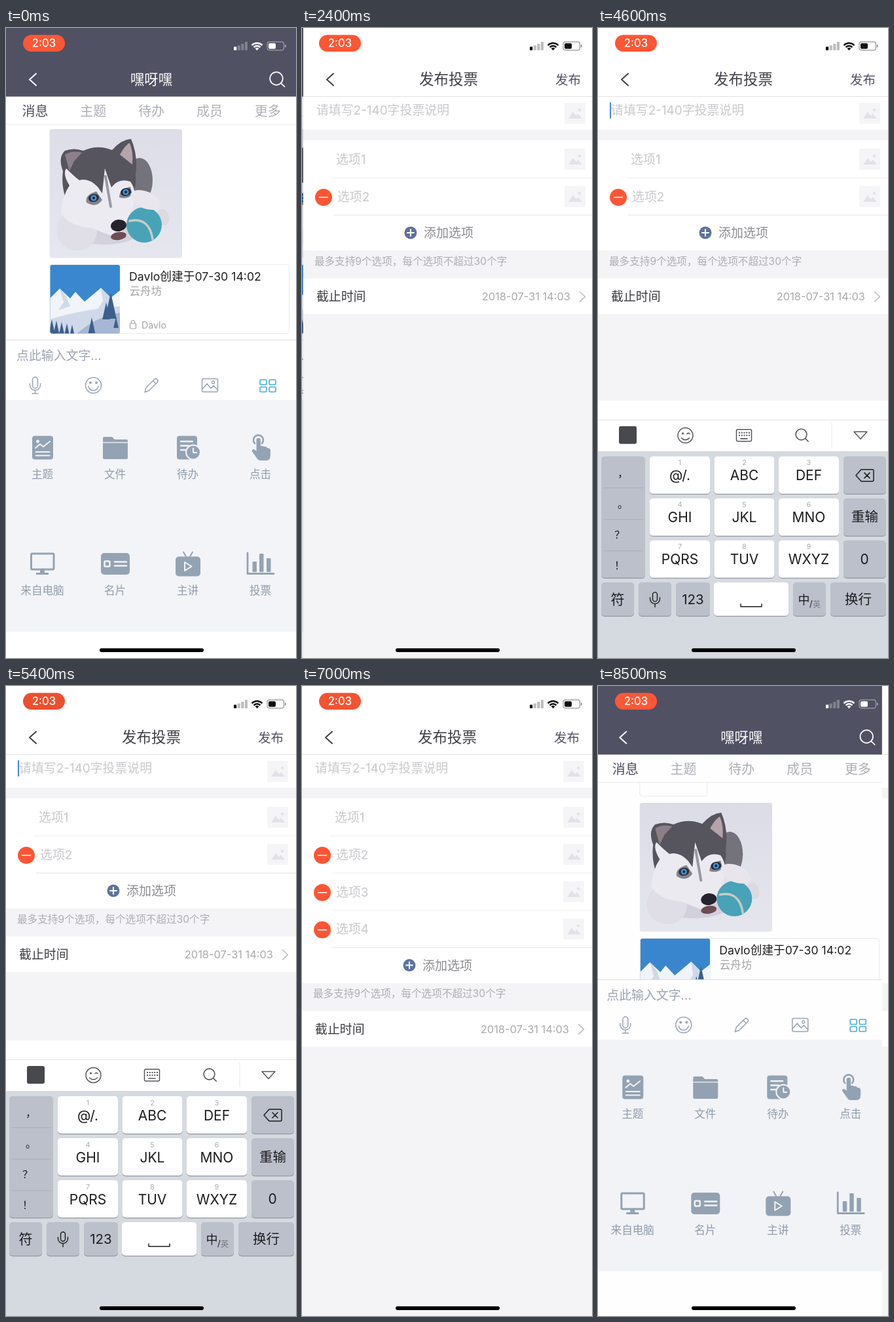
An HTML page that plays this animation: 443 by 960 pixels, repeating every 8600 ms.

```html
<!DOCTYPE html>
<html lang="zh-CN">
<head>
<meta charset="utf-8">
<title>发布投票</title>
<style>
html, body { margin: 0; width: 100%; height: 100%; overflow: hidden; background: #fff; }
svg { display: block; width: 443px; height: 960px; }
text { font-family: Inter, "Noto Sans CJK SC", "Noto Sans CJK", sans-serif; white-space: pre; }
.line { fill: none; stroke-linecap: round; stroke-linejoin: round; }
</style>
</head>
<body>
<svg id="stage" viewBox="0 0 443 960"></svg>
<script>
const W = 443, LOOP = 8600, STEP = 100, ROW = 56.8;
const INK = '#94a3b3', PANEL = '#f3f4f7', RED = '#ff5535';

// Markup helpers
const rect = (x, y, w, h, fill, rx = 0, more = '') =>
  `<rect x="${x}" y="${y}" width="${w}" height="${h}" fill="${fill}" rx="${rx}" ${more}/>`;
const circle = (x, y, r, fill, more = '') =>
  `<circle cx="${x}" cy="${y}" r="${r}" fill="${fill}" ${more}/>`;
const oval = (x, y, rx, ry, fill, turn = 0) =>
  `<ellipse rx="${rx}" ry="${ry}" fill="${fill}" transform="translate(${x} ${y}) rotate(${turn})"/>`;
const shape = (d, fill) => `<path d="${d}" fill="${fill}"/>`;
const line = (d, color, w = 1.5) =>
  `<path class="line" d="${d}" stroke="${color}" stroke-width="${w}"/>`;
const text = (x, y, size, fill, str, anchor = 'start', weight = 400) =>
  `<text x="${x}" y="${y}" font-size="${size}" fill="${fill}" text-anchor="${anchor}" font-weight="${weight}">${str}</text>`;
const mid = (x, y, size, fill, str, weight) => text(x, y, size, fill, str, 'middle', weight);
const group = (id, body) => `<g id="${id}">${body}</g>`;
const ring = (x, y, r, color, w = 1.5) =>
  circle(x, y, r, 'none', `stroke="${color}" stroke-width="${w}"`);

const back = color => line('M46 69.5L36 78.5L46 87.5', color, 2);
const lens = (x, y, r, color, w) =>
  ring(x, y, r, color, w) + line(`M${x + r * .72} ${y + r * .72}l${r * .55} ${r * .55}`, color, w);

function puppy() {
  const dark = '#56545d', fur = '#ecebf1';
  return `<g clip-path="url(#photo)">` +
    rect(66, 154, 203, 197, 'url(#snow)') +
    oval(204, 232, 20, 34, '#74727b') +
    oval(150, 306, 58, 24, '#d3d2dc') +
    oval(108, 309, 31, 30, '#e0dfe7', 25) +
    shape('M92 262Q84 240 87 218Q79 197 90 187Q104 182 118 187Q140 177 162 186Q176 170 191 169Q202 194 198 224Q200 246 190 258Z', dark) +
    shape('M90 193Q102 186 116 190L104 203L97 218Z', '#8d8088') +
    shape('M174 193Q182 178 189 175Q195 190 193 208Z', '#b5a4aa') +
    shape('M97 240Q86 222 92 214Q104 226 112 232Q126 228 140 242L147 252L151 214L161 243Q172 228 190 234Q203 252 191 280Q184 310 166 318Q150 313 132 305Q96 302 84 282Q86 256 97 240Z', fur) +
    shape('M123 266Q120 254 138 249L147 262Q138 275 123 266ZM173 258Q173 245 190 242L193 254Q184 262 173 258Z', '#85838e') +
    line('M152 226L160 272', '#9a98a3', 4) +
    [[134, 259], [183, 250]].map(([x, y]) =>
      oval(x, y, 8, 6, '#2d2c35', -10) + circle(x, y, 4.6, '#3f94dc') + circle(x, y, 2, '#16233a')).join('') +
    oval(172, 317, 12, 6, '#6d4d55', -8) +
    oval(172, 301, 12, 9, '#25232b', -8) +
    oval(240, 288, 9, 13, '#dedae1', -15) +
    circle(211, 300, 27, '#48a3b9') +
    line('M189 294Q219 288 224 322', '#c9cdc4', 3.5) +
    oval(213, 262, 24, 13, '#e9e7ed', 22) +
    '</g>';
}

function tree(x, y, h) {
  const w = h * .22;
  return shape(`M${x} ${y}l${w} ${h}h${-2 * w}Z`, '#3d5f8c');
}

function mountains() {
  return `<g clip-path="url(#hill)">` +
    rect(67, 360, 107, 106, '#3a87cf') +
    shape('M67 412L82 397L98 412L106 402L120 417L145 396L160 411L174 400V466H67Z', '#f1f4f9') +
    shape('M82 397L88 418L80 430L98 424L92 409ZM145 396L148 416L138 432L158 426L160 411Z', '#cfdaea') +
    shape('M67 444Q110 430 174 424V466H67Z', '#d0d9ea') +
    shape('M108 466Q140 438 174 434V466Z', '#a6b6d4') +
    tree(160, 403, 40) + tree(153, 418, 26) + tree(131, 441, 24) + tree(168, 440, 17) +
    [70, 77, 85, 93, 101].map((x, i) => tree(x, 444 + i * 2, 24)).join('') +
    '</g>';
}

function messages() {
  const edge = 'stroke="#e8eaec"';
  return rect(66.5, 60, 103, 84, '#fff', 4, edge) + puppy() +
    rect(67, 360.5, 365.5, 105, '#fff', 4, edge) + mountains() +
    text(188, 385, 17.7, '#1d1d20', 'Davlo创建于07-30 14:02') +
    text(188.5, 407, 16.5, '#a3a3a7', '云舟坊') +
    rect(189.5, 450, 9, 8, 'none', 1, 'stroke="#a3a3a7" stroke-width="1.2"') +
    line('M191.5 450v-2a2.5 2.5 0 0 1 5 0v2', '#a3a3a7', 1.2) +
    text(207, 457.5, 14.2, '#a3a3a7', 'Davlo');
}

function inputIcons() {
  const c = '#9aa4b4';
  return rect(40.5, 532, 8, 17, 'none', 4, `stroke="${c}" stroke-width="1.5"`) +
    line('M36.5 542v2a8 8 0 0 0 16 0v-2M44.5 552v5M40 557h9', c) +
    ring(133.5, 544.5, 12, c) + circle(129, 540.5, 2, c) + circle(138, 540.5, 2, c) +
    line('M126 546a7.600 7.600 0 0 0 15 0', c) +
    line('M212 555l2-7l13-13q2-1.500 4 .5t.5 4l-13 13ZM224.500 537.500l4.500 4.500', c) +
    rect(299.5, 534.5, 24, 20, 'none', 2, `stroke="${c}" stroke-width="1.5"`) +
    line('M300 550l7-8l6 7l4-4l6 6', c) + ring(316.5, 540, 2, c, 1.3) +
    [[388, 536], [402, 536], [388, 547], [402, 547]].map(([x, y]) =>
      rect(x, y, 10, 7.5, 'none', 1.5, 'stroke="#48acd8" stroke-width="1.6"')).join('');
}

function toolIcons() {
  const cut = PANEL;
  return [
    rect(40, 621.5, 32, 36, INK, 4) + circle(48.5, 630, 2.4, cut) +
      line('M45 640l7-6l5 4l10-8', cut, 2) + line('M45.500 646h21M45.500 651.500h21', cut, 2),
    shape('M148 631v-6q0-2 2-2h12l4 4h18q2 0 2 2v2ZM148 632.300h38v22.200q0 2.500-2.500 2.500h-33q-2.500 0-2.500-2.500Z', INK),
    rect(261, 621.5, 31, 36, INK, 4) + line('M267 630h18M267 636.500h12M267 643h7', cut, 2.3) +
      circle(286, 646.5, 11, INK, `stroke="${cut}" stroke-width="2"`) + line('M286 640.500v6.500h5', cut, 2),
    line('M380 633a7.500 7.500 0 1 1 11 0', INK, 2.6) +
      shape('M382.500 628a3.200 3.200 0 0 1 6.400 0v9q3-1 5 1q4-1 5 2q4-.5 5 3v8q0 8-6 8h-9q-4 0-6-4l-6.500-9q-1.500-3 1-4q2.500-.5 5.100 3Z', INK),
    rect(38.5, 801, 34.5, 24, 'none', 1.5, `stroke="${INK}" stroke-width="3"`) +
      shape('M52 826h7v4h6v3h-19v-3h6Z', INK),
    rect(145, 800, 44, 33, INK, 5) +
      rect(150.5, 812.5, 8, 8, 'none', 1.5, `stroke="${cut}" stroke-width="2.4"`) +
      line('M166 813.500h18M166 819.500h18', cut, 2.4),
    rect(259, 805.5, 38, 30, INK, 5) + line('M271 798.500l4 7M285 798.500l-4 7', INK, 2) +
      line('M273 814v13l10.500-6.500Z', cut, 2),
    line('M369 800v31.500h40', INK, 2.8) +
      rect(376.5, 813, 6.5, 16, INK, 1) + rect(387, 801, 6.5, 28, INK, 1) + rect(398, 808, 6.5, 21, INK, 1)
  ].join('');
}

function chat() {
  const labels = ['主题', '文件', '待办', '点击', '来自电脑', '名片', '主讲', '投票'];
  const tabs = ['消息', '主题', '待办', '成员', '更多'];
  const composer = rect(0, 475, W, 520, '#fff') + rect(0, 475, W, 1, '#dadde1') +
    text(16, 506, 18.9, '#9ba3b2', '点此输入文字...') + inputIcons() +
    rect(0, 567, W, 353, PANEL) + toolIcons() +
    labels.map((s, i) =>
      mid(55.5 + i % 4 * 111, i < 4 ? 685.5 : 862.5, 16.6, '#8f9cae', s)).join('');
  return rect(0, 0, W, 960, '#fff') + group('feed', messages()) + group('composer', composer) +
    rect(0, 104, W, 43, '#fff') + rect(0, 146.5, W, 1, '#ebebee') +
    tabs.map((s, i) =>
      mid(44.5 + i * 88.8, 133.5, 20, i ? '#adafb6' : '#4a4b5c', s, i ? 400 : 500)).join('') +
    rect(0, 0, W, 104.5, '#505163') + back('#fff') + mid(222, 86, 21.3, '#fff', '嘿呀嘿') +
    lens(413, 77, 9.8, '#fff', 1.7);
}

function thumb(y) {
  return rect(399, y, 32, 32, '#f5f5f7') +
    shape(`M405 ${y + 24}l7-10l5 6l3-3l6 7Z`, '#e2e2e8') + circle(422, y + 11, 2.2, '#e2e2e8');
}

function option(n) {
  const y = 171 + (n - 1) * ROW, x = n > 1 ? 46 : 43;
  return rect(0, y + 1, W, ROW, '#fff') +
    (n > 1 ? circle(31, y + 30.2, 13, RED) + line(`M24.500 ${y + 30.2}h13`, '#fff', 1.6) : '') +
    text(n > 1 ? 52 : 50, y + 36, 18.9, '#c9c9cd', '选项' + n) + thumb(y + 13) +
    rect(x, y + ROW, W, 1, '#e9e9ec');
}

function form() {
  const lower = rect(0, 285.5, W, 54, '#fff') + rect(46, 284.6, W, 1, '#e9e9ec') +
    circle(164, 312, 9.5, '#5d729f') + line('M159 312h10M164 307v10', '#fff', 2) +
    text(184, 319, 19, '#8b8b91', '添加选项') +
    rect(0, 339, W, 640, '#f4f4f7') +
    text(17, 360.5, 15.6, '#adadb3', '最多支持9个选项，每个选项不超过30个字') +
    rect(0, 381.5, W, 54.5, '#fff') + text(20, 416, 18.9, '#3b3b41', '截止时间') +
    text(408, 415, 16.4, '#aaaaae', '2018-07-31 14:03', 'end') +
    line('M422.500 402l8 7.500l-8 7.500', '#bcbcc1', 1.6);
  return rect(0, 0, W, 960, '#fff') + back('#3f3f49') +
    mid(222, 86, 22.5, '#3f3f49', '发布投票', 500) + text(385, 85.5, 19.6, '#505165', '发布') +
    rect(0, 104, W, 1, '#e2e2e5') +
    text(20, 132, 18.9, '#c9c9cd', '请填写2-140字投票说明') + thumb(114) +
    rect(18, 113, 2, 25, '#4a7fe8', 1, 'id="caret"') +
    rect(0, 155, W, 16, '#f4f4f7') +
    [1, 2, 3, 4].map(option).join('') + group('lower', lower) + group('keys', keyboard());
}

function keyboard() {
  const ink = '#1c1c1f', c = '#55575c', grey = '#bbc0ca';
  const key = (x, y, w, h, fill) => rect(x, y + 1.2, w, h, '#93979f', 5) + rect(x, y, w, h, fill, 5);
  const words = ['@/.', 'ABC', 'DEF', 'GHI', 'JKL', 'MNO', 'PQRS', 'TUV', 'WXYZ'];
  const pads = words.map((s, i) => {
    const x = 79 + i % 3 * 98.5, y = 625 + Math.floor(i / 3) * 64;
    return key(x, y, 92, 57, '#fff') + mid(x + 46, y + 13.5, 11, '#abaeb5', i + 1) +
      mid(x + 46, y + 36.5, 21, ink, s);
  }).join('');
  const marks = ['，', '。', '？', '！'].map((s, i) =>
    mid(i < 2 ? 38 : 33, 656 + i * 47, 16, ink, s) +
    (i ? rect(8, 624.5 + i * 48, 61, 1, '#a9aeb8') : '')).join('');
  return rect(0, 540, W, 77, '#fff') + rect(0, 569, W, 1, '#e4e5e8') +
    rect(32, 579, 27, 27, '#48494c', 3) +
    ring(133.5, 593, 11.5, c) + circle(129.5, 590, 1.6, c) +
    line('M136 590.500q2-2 4 0M127.500 597q6 5.500 12 0', c) +
    rect(211.5, 584, 23, 18, 'none', 2, `stroke="${c}" stroke-width="1.5"`) +
    `<path d="M215 589h17M215 593h17" stroke="${c}" stroke-width="2" stroke-dasharray="2 1.750"/>` +
    line('M218 598h10', c, 1.7) + lens(310.5, 591.5, 8.4, c, 1.6) +
    rect(356.5, 574, 1, 37, '#e6e7ea') + line('M391 587.500h20l-10 11Z', c) +
    rect(0, 617, W, 343, '#d5d9e0') + key(5, 625, 67, 185, grey) + marks + pads +
    [625, 689, 753].map(y => key(375, y, 65, 57, grey)).join('') +
    line('M394 654l8-9h17q2 0 2 2v14q0 2-2 2h-17ZM407 650l8 8M415 650l-8 8', ink) +
    mid(407.5, 724.5, 20.5, ink, '重输') + mid(407, 789, 21, ink, '0') +
    [[5, 50], [62, 50], [119, 52], [298, 50], [355, 85]].map(([x, w]) => key(x, 817, w, 51, grey)).join('') +
    key(177, 817, 114, 51, '#fff') + line('M218 850v4h32v-4', ink) +
    mid(30, 850, 21, ink, '符') + mid(145, 850, 20.5, ink, '123') + mid(397.5, 850, 20.5, ink, '换行') +
    rect(83.5, 832, 7, 14, 'none', 3.5, `stroke="${ink}" stroke-width="1.4"`) +
    line('M79.500 840v2a7.500 7.500 0 0 0 15 0v-2M87 850v4.500', ink, 1.4) +
    text(305.5, 850, 18, ink, '中') + text(323, 854, 13, ink, '/') + text(328, 855, 12, '#77797f', '英');
}

function statusIcons() {
  const fg = 'currentColor';
  const bars = [5.5, 7.5, 10, 13].map((h, i) =>
    rect(348 + i * 5.6, 34 - h, 4.2, h, fg, 1, `opacity="${i ? .28 : 1}"`)).join('');
  const waves = `<path d="M375.500 26.300a11.500 11.500 0 0 1 16 0M378.500 29.300a7.300 7.300 0 0 1 10 0" fill="none" stroke="${fg}" stroke-width="2.500"/>` +
    shape('M383.500 34.300l-3-3.200q3-2.200 6 0Z', fg);
  return bars + waves +
    rect(399, 21.2, 25.5, 12.6, 'none', 3.5, `stroke="${fg}" stroke-opacity=".45" stroke-width="1.2"`) +
    rect(401, 23.2, 11, 8.6, fg, 1.8) + rect(426, 25.3, 1.6, 4.4, fg, .8, 'opacity=".5"');
}

const stage = document.getElementById('stage');
stage.innerHTML = `<defs>
  <linearGradient id="snow" x1="0" y1="0" x2="0" y2="1"><stop stop-color="#dddde7"/><stop offset="1" stop-color="#e6e7ee"/></linearGradient>
  <clipPath id="photo">${rect(66.5, 154, 202.5, 196.5, '#000', 4)}</clipPath>
  <clipPath id="hill">${rect(67.5, 361, 106.5, 104.5, '#000', 3)}</clipPath></defs>` +
  group('chat', chat()) + rect(0, 0, W, 960, '#000', 0, 'id="dim"') + group('form', form()) +
  rect(26, 10.5, 64, 25.5, RED, 12.7, 'id="pill"') + mid(58, 29.3, 16.6, '#fff', '2:03', 500) +
  group('status', statusIcons()) + rect(143, 945.3, 159, 5.6, '#000', 2.8);

const el = {};
for (const id of ['chat', 'dim', 'form', 'feed', 'composer', 'lower', 'keys', 'caret', 'pill', 'status'])
  el[id] = document.getElementById(id);
const move = (name, x, y) => el[name].setAttribute('transform', `translate(${x.toFixed(2)} ${y.toFixed(2)})`);

// Critically damped spring, 0 to 1
function spring(t, start) {
  const x = Math.max(0, t - start) * .02;
  return 1 - (1 + x) * Math.exp(-x);
}
function ease(t, start, end) {
  const p = Math.min(1, Math.max(0, (t - start) / (end - start)));
  return p * p * (3 - 2 * p);
}

function render(t) {
  const late = t > 5000;
  const shown = spring(t, 2020) - spring(t, 8210);
  move('form', W * (1 - shown), 0);
  move('chat', -132 * shown, 0);
  el.dim.setAttribute('opacity', .1 * shown);
  move('feed', 0, late ? 24 : 0);
  move('composer', 0, late ? -28 : 0);
  move('lower', 0, ROW * (ease(t, 5990, 6200) + ease(t, 6690, 6980)));
  move('keys', 0, 420 * (1 - spring(t, 4380) + spring(t, 5410)));
  const caret = t >= 4400 && t < 5500 && !(t >= 4900 && t < 5200);
  el.caret.setAttribute('opacity', caret ? 1 : 0);
  const glow = (1 + Math.cos(t / 2150 * 2 * Math.PI)) / 2;
  el.pill.setAttribute('fill', `rgb(${Math.round(236 + 19 * glow)},${Math.round(79 + 8 * glow)},${Math.round(47 + 7 * glow)})`);
  el.status.setAttribute('color', shown > .5 ? '#111' : '#fff');
}

function tick() {
  render(Math.floor(performance.now() % LOOP / STEP) * STEP);
  requestAnimationFrame(tick);
}
tick();
</script>
</body>
</html>
```
